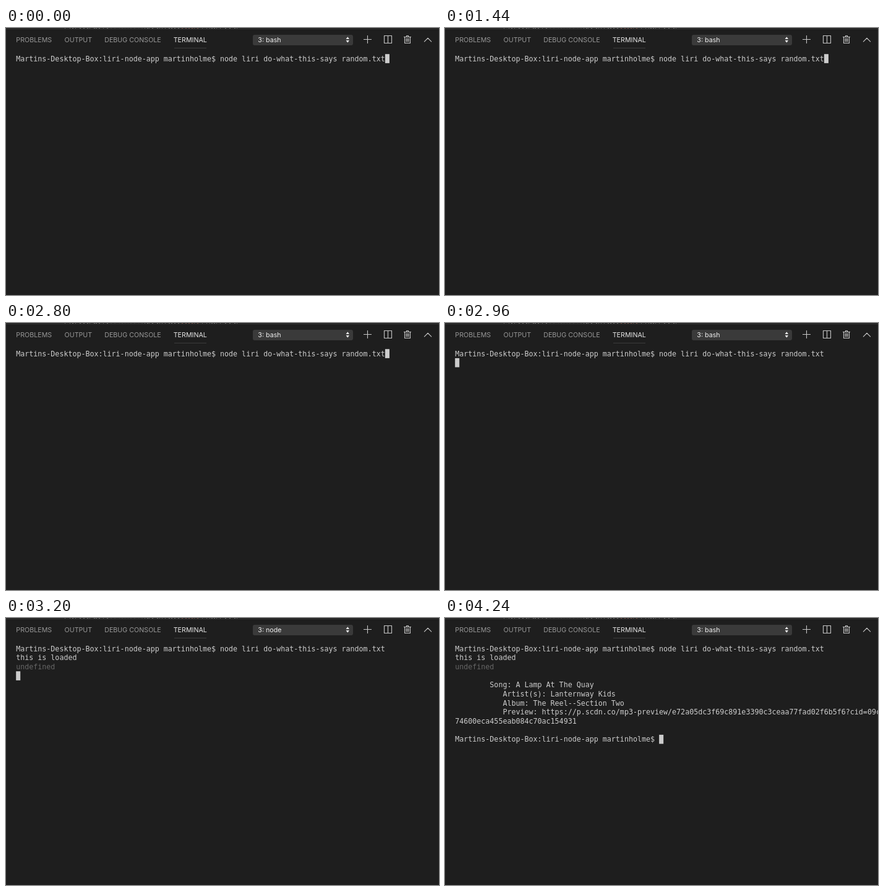
An HTML page with a canvas that plays this animation: 700x432 px, repeating every 4.56 s.

```html
<!DOCTYPE html>
<html lang="en">
<head>
<meta charset="utf-8">
<title>Terminal</title>
<style>
html, body { margin: 0; width: 100%; height: 100%; overflow: hidden; background: #1e1e1e; }
canvas { display: block; width: 700px; height: 432px; }
</style>
</head>
<body>
<canvas id="stage" width="700" height="432"></canvas>
<script>
const ctx = document.getElementById('stage').getContext('2d');
const LOOP = 4560;
const ENTER = 2960, LOADED = 3120, NODE = 3200, RESULT = 3520, BASH = 3600;
const LEFT = 16.2, TOP = 42.2, CELL = 7.02, ROW = 14.67;
const MONO = '11.66px "DejaVu Sans Mono", monospace';
const SANS = '10.7px Inter, sans-serif';

const prompt = 'Martins-Desktop-Box:liri-node-app martinholme$ ';
const command = prompt + 'node liri do-what-this-says random.txt';
const indent = ' '.repeat(11);
const result = [
  ' '.repeat(8) + 'Song: A Lamp At The Quay',
  indent + 'Artist(s): Lanternway Kids',
  indent + 'Album: The Reel--Section Two',
  indent + 'Preview: https://p.scdn.co/mp3-preview/e72a05dc3f69c891e3390c3ceaa77fad02f6b5f6?cid=09c',
  '74600eca455eab084c70ac154931',
  '',
  prompt
];

function text(str, x, y, color, font) {
  ctx.font = font;
  ctx.fillStyle = color;
  ctx.fillText(str, x, y);
}

function fill(color, x, y, w, h) {
  ctx.fillStyle = color;
  ctx.fillRect(x, y, w, h);
}

function line(row, str, color = '#cccccc') {
  text(str, LEFT, TOP + row * ROW + 11.4, color, MONO);
}

function cursor(row, col) {
  fill('#cccccc', LEFT + col * CELL, TOP + row * ROW, CELL, ROW);
}

function triangle(x, y, h) {
  ctx.beginPath();
  ctx.moveTo(x - 2.7, y);
  ctx.lineTo(x + 2.7, y);
  ctx.lineTo(x, y + h);
  ctx.fill();
}

// Lower edge of the code line that is cut off by the panel
function codeEdge() {
  let seed = 7;
  const rand = () => (seed = (seed * 16807) % 2147483647) / 2147483647;
  for (let x = 95; x < 376; x += 3 + rand() * 5) {
    const gap = x > 165 && x < 222;
    const keyword = x > 281 && x < 312;
    fill(gap ? '#303030' : keyword ? '#704a40' : '#686868', Math.round(x), 0, 1 + Math.round(rand()), 1);
  }
  fill('#343434', 0, 1, 700, 1);
}

function plus(x, y, r) {
  ctx.moveTo(x - r, y);
  ctx.lineTo(x + r, y);
  ctx.moveTo(x, y - r);
  ctx.lineTo(x, y + r);
}

function split(x, y, size) {
  ctx.rect(x, y, size, size);
  ctx.moveTo(x + size / 2, y);
  ctx.lineTo(x + size / 2, y + size);
}

function bin(x, y) {
  ctx.rect(x - 4.5, y, 9, 10);
  ctx.rect(x - 1.5, y - 2, 3, 2);
  ctx.moveTo(x - 6, y);
  ctx.lineTo(x + 6, y);
  for (let rib = -2; rib <= 2; rib += 2) {
    ctx.moveTo(x + rib, y + 2);
    ctx.lineTo(x + rib, y + 8);
  }
}

function chevron(x, y, r) {
  ctx.moveTo(x - r, y + r);
  ctx.lineTo(x, y);
  ctx.lineTo(x + r, y + r);
}

function icons() {
  ctx.strokeStyle = '#c5c5c5';
  ctx.lineWidth = 1.1;
  ctx.beginPath();
  plus(584.5, 18.5, 6.5);
  split(611.5, 12.5, 12);
  bin(649, 14.5);
  chevron(682, 16.3, 6);
  ctx.stroke();
}

function header(label) {
  codeEdge();
  text('PROBLEMS', 16.3, 23.3, '#989898', SANS);
  text('OUTPUT', 94.5, 23.3, '#989898', SANS);
  text('DEBUG CONSOLE', 159.2, 23.3, '#989898', SANS);
  text('TERMINAL', 270.7, 23.3, '#e7e7e7', SANS);
  fill('#3c3c3c', 272, 32, 52, 1);

  ctx.fillStyle = '#3a3a3a';
  ctx.beginPath();
  ctx.roundRect(399, 11, 162, 17, 3);
  ctx.fill();
  text(label, 407.3, 23.3, '#f0f0f0', SANS);
  triangle(552.3, 18, -3.8);
  triangle(552.3, 20, 3.8);
  icons();
}

function draw(t) {
  fill('#1e1e1e', 0, 0, 700, 432);
  header(t >= NODE && t < BASH ? '3: node' : '3: bash');

  line(0, command);
  if (t >= LOADED) {
    line(1, 'this is loaded');
    line(2, 'undefined', '#666666');
  }
  if (t >= RESULT) result.forEach((str, i) => line(4 + i, str));

  if (t < ENTER) cursor(0, command.length);
  else if (t < LOADED) cursor(1, 0);
  else if (t < RESULT) cursor(3, 0);
  else cursor(10, prompt.length);
}

const start = performance.now();
function tick() {
  draw((performance.now() - start) % LOOP);
  requestAnimationFrame(tick);
}
tick();
</script>
</body>
</html>
```
